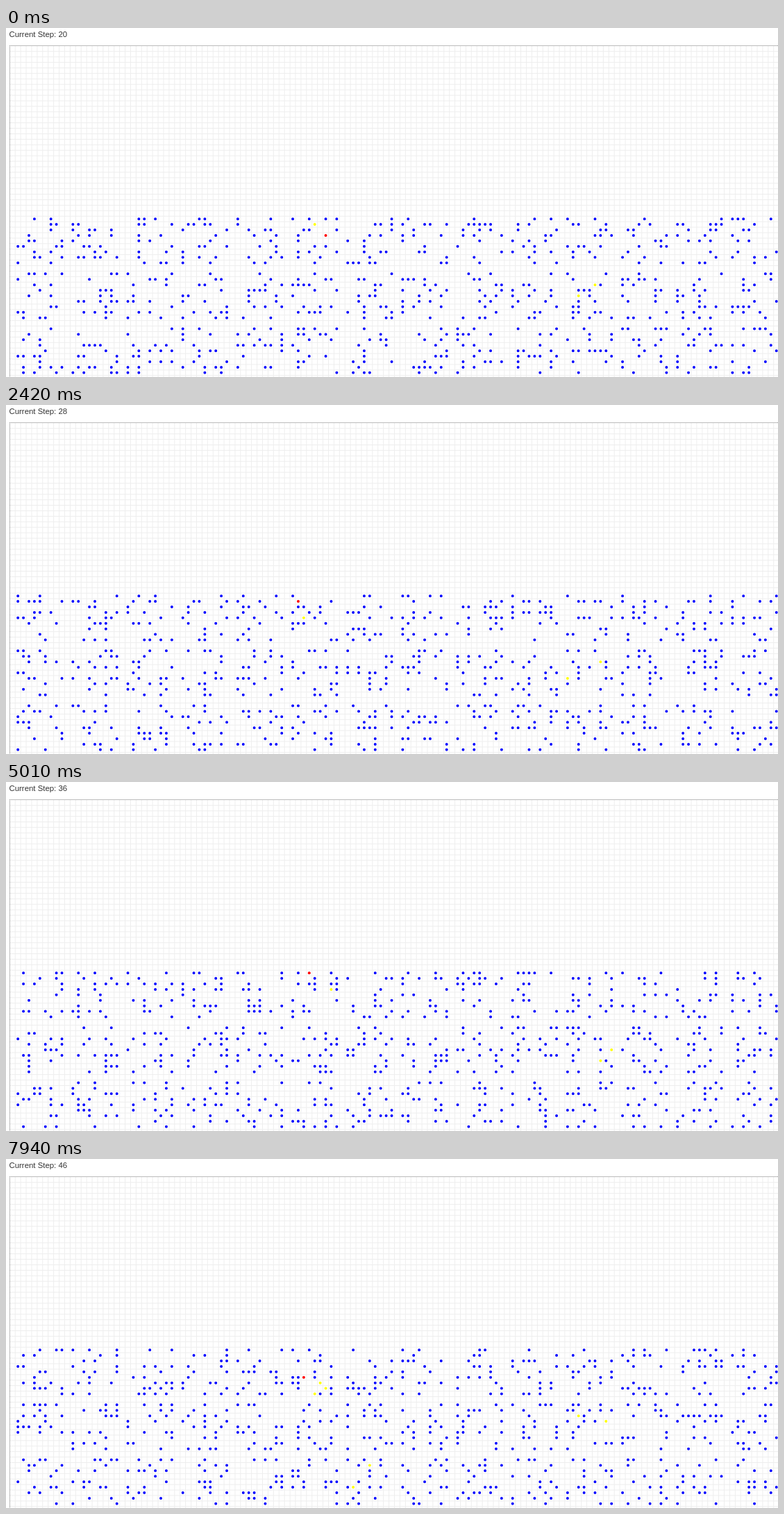
Animation, 1112 px wide and 503 px high, one loop 8 s. Source, as an HTML page with a canvas:

```html
<!DOCTYPE html>
<html lang="en">
<head>
<meta charset="utf-8">
<title>Step simulation</title>
<style>
  html, body { margin: 0; width: 100%; height: 100%; overflow: hidden; background: #fff; }
  canvas { position: absolute; left: 0; top: 0; }
  #label {
    position: absolute; left: 4.5px; top: 3px; white-space: pre;
    font: 11.4px/13px "Liberation Sans", Arial, sans-serif; color: #333;
  }
</style>
</head>
<body>
<canvas id="stage" width="1112" height="503"></canvas>
<div id="label">Current Step: <span id="step">20</span></div>
<script>
const W = 1112, H = 503, CELL = 7.917, LEFT = 5.3, TOP = 25.8;
const LOOP = 8000, REDRAW = 172.2;

// Each step lasts STEP_MS; people are at home for a short part of it.
const STEP_MS = 298, STEP_OFFSET = 70, FIRST_STEP = 20;
const HOME_FROM = 125, HOME_TO = 165;

const ROOM_COLS = 14, ROOM_ROWS = 3, ROOM_SIZE = 9, PER_ROOM = 20;
const HOMES = [13, 23, 23], PER_HOME = 10;
const BLUE = '#0000ff', RED = '#ff0000', YELLOW = '#ffff00';

const ctx = document.getElementById('stage').getContext('2d');
const stepText = document.getElementById('step');

function random(seed) {
  let s = seed * 2654435761 >>> 0;
  return () => {
    s = s + 0x6D2B79F5 >>> 0;
    let t = Math.imul(s ^ s >>> 15, s | 1);
    t ^= t + Math.imul(t ^ t >>> 7, t | 61);
    return ((t ^ t >>> 14) >>> 0) / 4294967296;
  };
}

function stateAt(t) {
  const time = Math.floor(t / REDRAW) * REDRAW;
  const phase = time % STEP_MS;
  return {
    step: FIRST_STEP + Math.floor((time + STEP_OFFSET) / STEP_MS),
    home: phase >= HOME_FROM && phase < HOME_TO
  };
}

function seats(rnd, count, roomCol, roomRow) {
  const pick = () => Math.floor(rnd() * ROOM_SIZE);
  return Array.from({ length: count }, () => [1 + roomCol * 10 + pick(), 31 + roomRow * 10 + pick()]);
}

function atWork(step) {
  const rnd = random(step);
  const late = step > FIRST_STEP + 18;
  const people = [];
  for (let row = 0; row < ROOM_ROWS; row++)
    for (let col = 0; col < ROOM_COLS; col++)
      people.push(...seats(rnd, PER_ROOM, col, row));
  return {
    people,
    red: seats(rnd, 1, 5, 0),
    yellow: [
      ...seats(rnd, late ? 3 : 1, 5, 0),
      ...seats(rnd, 2, 10, 1),
      ...seats(rnd, late ? 2 : 0, 6, 2)
    ]
  };
}

function atHome() {
  const people = [];
  HOMES.forEach((homes, band) => {
    for (let i = 0; i < homes; i++)
      for (let k = 0; k < PER_HOME; k++)
        people.push([1 + i * 3 + k % 2, 13 + band * 6 + (k >> 1)]);
  });
  return { people, red: [[46, 19]], yellow: [[43, 20], [46, 20]] };
}

function drawGrid() {
  ctx.clearRect(0, 0, W, H);
  ctx.fillStyle = '#eeeeee';
  for (let x = LEFT + CELL; x < W; x += CELL) ctx.fillRect(x - 0.5, 26, 1, H);
  for (let y = TOP + CELL; y < H; y += CELL) ctx.fillRect(5, y - 0.5, W, 1);
  ctx.fillStyle = '#777';
  for (let x = 5; x < W; x += 2) ctx.fillRect(x, 25, 1, 1);
  for (let y = 25; y < H; y += 2) ctx.fillRect(5, y, 1, 1);
}

function dots(cells, color) {
  ctx.fillStyle = color;
  ctx.beginPath();
  for (const [col, row] of cells) {
    const x = LEFT + (col + 0.5) * CELL, y = TOP + (row + 0.5) * CELL;
    ctx.moveTo(x + 2, y);
    ctx.arc(x, y, 2, 0, Math.PI * 2);
  }
  ctx.fill();
}

function draw({ step, home }) {
  const { people, red, yellow } = home ? atHome() : atWork(step);
  const marked = new Set([...red, ...yellow].map(String));
  drawGrid();
  dots(people.filter(p => !marked.has(String(p))), BLUE);
  dots(yellow, YELLOW);
  dots(red, RED);
  stepText.textContent = step;
}

let shown = '';
const start = performance.now();
function tick(now) {
  const state = stateAt(Math.max(0, now - start) % LOOP);
  const key = state.step + ' ' + state.home;
  if (key !== shown) {
    shown = key;
    draw(state);
  }
  requestAnimationFrame(tick);
}
tick(start);
</script>
</body>
</html>
```
